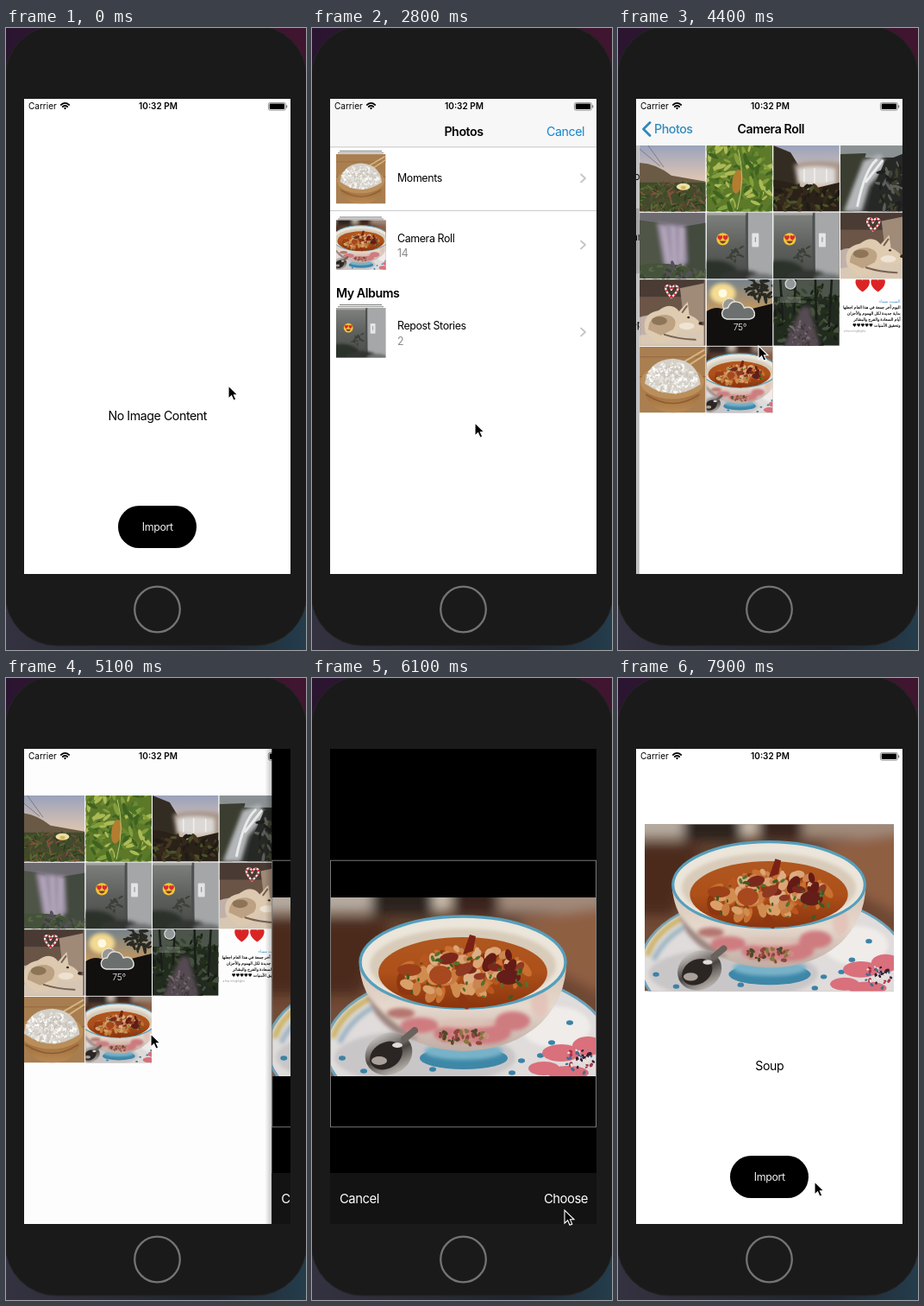
Write an HTML page that moves like this. It is 348 px wide and 720 px high and loops after 8000 ms.

```html
<!DOCTYPE html>
<html lang="en">
<head>
<meta charset="utf-8">
<title>Photo import</title>
<style>
  html, body { margin: 0; width: 100%; height: 100%; overflow: hidden; background: #1a1a1a; }
  svg { display: block; }
  text { font-family: Inter, Roboto, sans-serif; letter-spacing: -.03em; }
  .mid { text-anchor: middle; }
  .end { text-anchor: end; }
  .bold { font-weight: 600; }
  .status { font-size: 10px; letter-spacing: 0; }
  .row { font-size: 12.4px; }
  .nav { font-size: 14.2px; }
  .note { font-size: 4.7px; letter-spacing: 0; }
</style>
</head>
<body>
<svg id="stage" width="348" height="720" viewBox="0 0 348 720"></svg>
<script>
const W = 309, H = 550, LOOP = 8000;

let seed = 7;
const rnd = () => (seed = (seed * 16807) % 2147483647) / 2147483647;

// Elliptical spread of small rotated blobs.
function scatter(n, cx, cy, rx, ry, colors, sx, sy) {
  let out = '';
  for (let i = 0; i < n; i++) {
    const a = rnd() * 6.283, r = Math.sqrt(rnd()), k = .65 + rnd() * .7;
    const x = (cx + r * rx * Math.cos(a)).toFixed(1), y = (cy + r * ry * Math.sin(a)).toFixed(1);
    out += `<ellipse cx="${x}" cy="${y}" rx="${(sx * k).toFixed(1)}" ry="${(sy * k).toFixed(1)}" fill="${colors[i % colors.length]}" transform="rotate(${Math.round(rnd() * 180)} ${x} ${y})"/>`;
  }
  return out;
}
const rect = (x, y, w, h, fill, more = '') => `<rect x="${x}" y="${y}" width="${w}" height="${h}" fill="${fill}" ${more}/>`;
const oval = (x, y, rx, ry, fill, more = '') => `<ellipse cx="${x}" cy="${y}" rx="${rx}" ry="${ry}" fill="${fill}" ${more}/>`;
const path = (d, fill, more = '') => `<path d="${d}" fill="${fill}" ${more}/>`;
const line = (d, color, width) => path(d, 'none', `stroke="${color}" stroke-width="${width}" stroke-linecap="round" stroke-linejoin="round"`);
const text = (x, y, s, cls = '', fill = '#000', more = '') => `<text x="${x}" y="${y}" class="${cls}" fill="${fill}" ${more}>${s}</text>`;
const use = (id, x, y, w, h = w) => `<use href="#${id}" x="${x}" y="${y}" width="${w}" height="${h}"/>`;
const gradient = (id, ...stops) => `<linearGradient id="${id}" x2="0" y2="1">` +
  stops.map((c, i) => `<stop offset="${i / (stops.length - 1)}" stop-color="${c}"/>`).join('') + '</linearGradient>';
const symbol = (id, body, w = 77, h = 77) =>
  `<symbol id="${id}" viewBox="0 0 ${w} ${h}" preserveAspectRatio="xMidYMid slice">${body}</symbol>`;
const heart = (x, y, s, fill) => path('M0 9C-12 1-8-8-3-7Q0-6 0-3Q0-6 3-7C8-8 12 1 0 9Z', fill, `transform="translate(${x} ${y}) scale(${s})"`);
const blurs = { faint: .7, soft: 2.2, deep: 7 };
const soften = (body, amount = 'deep') => `<g filter="url(#${amount})">${body}</g>`;

const soup =
  rect(0, 0, 309, 207, 'url(#table)') +
  soften(rect(-20, -16, 75, 34, '#b5aa9f') + rect(48, -20, 80, 40, '#2b211c') + rect(120, -10, 20, 26, '#cfc3b3') +
    rect(142, -14, 58, 32, '#38231b') + rect(196, -16, 140, 34, '#a08a7a') + path('M215 25L330 10V120L270 90Z', '#8f5f43') +
    path('M-20 26H70L34 112H-20Z', '#4b2b1f')) +
  oval(160, 174, 165, 89, '#dfdcdb', 'stroke="#6aa3bd" stroke-width="3"') +
  soften(oval(110, 185, 105, 32, '#c9c6c8') + oval(262, 150, 40, 24, '#efecea') +
    line('M4 160Q14 134 44 118', '#cdb469', 7) + line('M12 166Q24 142 48 128', '#9cb4c2', 6), 'soft') +
  soften([[14, 186], [39, 201], [119, 199], [211, 203], [222, 189], [244, 183], [257, 168], [278, 145]]
    .map(([x, y]) => oval(x, y, 4, 2.8, '#3a83a6')).join('') +
    [[248, 198, 18, 8], [268, 180, 22, 10], [299, 172, 18, 11], [276, 203, 24, 8]].map(p => oval(...p, '#d9707c')).join('') +
    scatter(34, 288, 190, 18, 14, ['#321c32', '#a83047', '#ece2db', '#4a6b8d'], 2.4, 1.6), 'faint') +
  oval(155, 186, 51, 13, '#3d87a8') + soften(oval(155, 178, 46, 10, '#78b2c8'), 'soft') +
  path('M34 75Q34 110 66 143Q96 176 154 178Q211 177 245 145Q274 115 274 75Z', 'url(#bowl)') +
  soften(path('M40 108Q62 142 104 164Q76 165 52 134Z', '#9c8580') +
    [[104, 148, 22, 9], [178, 156, 32, 14], [212, 143, 20, 11], [146, 158, 26, 10]].map(p => oval(...p, '#cf7c80')).join('') +
    oval(82, 134, 16, 6, '#b57670') + oval(243, 122, 10, 16, '#e3c4ba') + oval(158, 146, 34, 5, '#dcc0b4'), 'soft') +
  soften(scatter(42, 154, 163, 33, 9, ['#4c4a29', '#8f463c', '#89763f', '#c98f82'], 3, 1.8), 'faint') +
  oval(154, 75, 119, 53, '#ebe5da', 'stroke="#559fbc" stroke-width="3.4"') +
  soften(oval(154, 79, 108, 43, '#d8cbb9'), 'soft') +
  oval(154, 87, 98, 41, 'url(#broth)') +
  soften(scatter(50, 154, 92, 82, 30, ['#b9561f', '#c8702f', '#8e3610'], 9, 4) +
    scatter(26, 138, 100, 52, 18, ['#d08d50', '#c97c3f', '#d9a06a'], 8, 5) +
    scatter(36, 168, 78, 54, 22, ['#dba577', '#cb8550', '#dcae84'], 6, 4) +
    scatter(10, 180, 76, 48, 19, ['#641b15', '#7c271b', '#8e3a23'], 9, 5) +
    oval(128, 90, 13, 11, '#a8481f') + oval(207, 92, 14, 9, '#641d18') + oval(92, 84, 14, 7, '#9c4019') +
    path('M154 66L162 43L169 45L166 62Z', '#7a2215') +
    scatter(32, 154, 94, 83, 31, ['#3c5a24', '#56702c'], 3, 1.6), 'faint') +
  oval(68, 181, 28, 24, 'url(#steel)', 'transform="rotate(-25 68 181)"') +
  soften(oval(65, 183, 20, 15, '#2b2624', 'transform="rotate(-30 65 183)"') + oval(57, 189, 9, 5, '#aaa19a') +
    oval(78, 171, 6, 3, '#e0dcd8') + line('M86 164L98 154', '#69625d', 8), 'faint');

const room =
  rect(0, 0, 77, 77, 'url(#wall)') + path('M48 0H77V77H49Z', '#a5a7a8') + path('M47 0V76', 'none', 'stroke="#4d5050" stroke-width="3"') +
  rect(0, 0, 46, 3, '#a5a5a0') + soften(oval(8, 70, 28, 14, '#2b302a') + oval(40, 76, 24, 9, '#333632') + oval(64, 78, 16, 7, '#6e7172'), 'soft') +
  rect(53, 24, 8, 16, '#e4e6e5', 'rx="1"') + line('M57 29V34', '#858989', 1) + scatter(14, 34, 46, 9, 13, ['#3b4038'], 3, 1) +
  oval(19, 31, 7.2, 7.2, '#f6c43a') + heart(15.8, 29, .36, '#d72d30') + heart(22.2, 29, .36, '#d72d30') +
  path('M15 33Q19 39 23 33Z', '#71401e');

const dog =
  rect(0, 0, 77, 77, '#6a5547') + rect(0, 0, 77, 20, '#4a3b34') + path('M48 10L77 4V49H53Z', '#a08a78') +
  path('M0 44Q36 32 77 55V77H0Z', '#c0b1ab') + path('M0 65L77 53V77H0Z', '#d8c8b4') +
  soften(path('M8 62Q2 40 23 36Q38 25 47 37L57 26L59 41Q72 46 74 57Q62 64 48 58Q39 76 20 73Z', '#decbb0') +
    path('M11 58Q12 40 33 41Q48 45 40 58L26 65Z', '#bda283') + oval(24, 48, 9, 5, '#8e7558') + oval(56, 54, 9, 4, '#efe4d3'), 'faint') +
  line('M51 38L56 31M30 64Q45 69 66 70', '#776154', 2) +
  oval(58, 44, 1.5, 1.2, '#30251f') + oval(72, 51, 2.3, 1.8, '#35271f') +
  line('M38 21Q28 10 33 7Q38 6 38 12Q40 5 45 8Q48 12 38 21', '#f5eeee', 2.2) +
  path('M38 21Q28 10 33 7Q38 6 38 12Q40 5 45 8Q48 12 38 21', 'none', 'stroke="#c82b32" stroke-width="2.2" stroke-dasharray="2 2.4"');

const cloud = 'M24 46Q18 45 18 39Q19 33 25 33Q28 24 36 26Q42 27 44 33Q54 30 56 39Q57 45 50 46Z';
const quote = ['اليوم آخر جمعة في هذا العام اجعلها', 'بداية جديدة لكل الهموم والأحزان', 'أيام السعادة والفرح والبشائر', '♥♥♥♥♥ وتحقيق الأمنيات'];

const photos = {
  meadow: rect(0, 0, 77, 77, 'url(#dusk)') + path('M0 20Q20 21 37 35L77 42V77H0Z', '#6b5a45') + line('M0 4L24 24M10 0L28 25', '#6d666c', .7) +
    rect(0, 43, 77, 34, '#3f4b2b') + scatter(170, 38, 62, 46, 19, ['#2c3b1c', '#5e6c32', '#5d4530', '#4a5a2a', '#80523c'], 4, .8) +
    oval(51, 48, 8, 4, '#ece1a8') + oval(51, 49, 3, 2, '#d5b957'),
  leaves: rect(0, 0, 77, 77, '#5d7a2a') + scatter(170, 38, 38, 53, 53, ['#83a03c', '#3f6320', '#adbb55', '#4e7226', '#6c8a30'], 6, 2) +
    oval(36, 42, 6, 14, '#b47d30', 'transform="rotate(8 36 42)"') + line('M37 5Q46 38 36 74', '#b9c56e', 1),
  falls: rect(0, 0, 77, 77, 'url(#dusk)') + path('M0 0L20 8L31 26V48H0Z', '#332c22') +
    soften(path('M24 22Q50 15 90 22V46H28Z', '#a8968a') + path('M28 27Q48 22 72 27V44Q48 48 30 43Z', '#dedad7'), 'soft') +
    line('M36 28V42M48 27V43M62 28V42', '#f2f0ee', 1.6) +
    path('M0 40Q26 43 39 52L77 43V77H0Z', '#2a2118') + scatter(70, 34, 62, 46, 15, ['#453821', '#1f1b15', '#4c5328', '#33281a'], 5, 2),
  cascade: rect(0, 0, 77, 77, '#2c2f2c') + rect(0, 0, 77, 14, '#8c9294') + path('M0 10L30 9L15 77H0Z', '#3a3d30') +
    soften(path('M27 17L47 10L54 24L34 47L25 77H4L17 43Z', '#b5b8ba'), 'soft') + line('M42 17Q29 28 20 70M49 18L30 42', '#ececec', 3) +
    path('M52 18L77 8V77H32L38 50Z', '#262825') + scatter(45, 62, 50, 18, 30, ['#41402f', '#1d201e', '#5d5f5c'], 5, 1.5),
  gorge: rect(0, 0, 77, 77, '#6d6a70') + path('M0 9L31 13L29 62L0 77Z', '#4f5547') + path('M77 12L48 17L52 61L77 77Z', '#434a3e') +
    soften(path('M20 12L54 16L56 58L43 69L28 60Z', '#9c8fa6') + line('M28 18L34 57M39 17L41 61M49 18L48 56', '#b9adc1', 4), 'soft') +
    path('M0 61Q39 55 77 70V77H0Z', '#46533b') + scatter(45, 38, 70, 44, 9, ['#3a4631', '#586447', '#55505a'], 4, 1.5),
  room, room2: room, dog,
  dog2: `<g transform="translate(-1 0)">${dog}</g>` + rect(75, 0, 2, 77, '#78655a'),
  sunset: rect(0, 0, 77, 77, 'url(#glow)') + soften(oval(19, 16, 15, 12, '#f5dc93'), 'soft') + oval(19, 16, 5, 5, '#fffbe2') +
    soften(path('M0 37Q12 29 24 37T45 36L85 26V85H0Z', '#11100f'), 'faint') + scatter(40, 64, 9, 18, 16, ['#292922'], 4, 1.5) +
    '<circle cx="27" cy="30" r="8" fill="#999990" stroke="#eee"/>' + path(cloud, '#6c706f', 'stroke="#e5e5e5" stroke-width="1.4"') +
    text(39, 59, '75°', 'mid', '#fff', 'font-size="10.5" font-weight="300"'),
  woods: rect(0, 0, 77, 77, '#222a20') + rect(0, 0, 77, 20, '#4d554c') + scatter(130, 38, 43, 43, 40, ['#233119', '#36452b', '#171f15', '#465240'], 4, 1.6) +
    soften(path('M33 32L42 32L55 82H10Z', '#574c53'), 'soft') + scatter(60, 34, 63, 18, 15, ['#75686f', '#403a3c', '#54494f'], 2, 1) +
    line('M8 0L11 47M26 0L24 40M49 0L50 46M68 0L65 54', '#191e18', 2.5) +
    '<circle cx="20" cy="5" r="6" fill="#92999a" stroke="#d8dcdc" stroke-width="1.3"/>' + rect(8, 20, 24, 7, '#9b9f99', 'opacity=".4"'),
  quote: rect(0, 0, 77, 77, '#fff') + heart(26, 5, 1.05, '#dc2424') + heart(44, 5, 1.05, '#dc2424') +
    text(70, 27, 'السبت مساء', 'note end', '#3588bb') +
    quote.map((s, i) => text(70, 34 + i * 7, s, 'note end bold', '#111')).join('') +
    text(4, 61, 'a few in highlights', '', '#999', 'font-size="3.2"'),
  rice: rect(0, 0, 77, 77, '#a97f51') + line('M0 12H77M0 35H77', '#94693f', 1) + line('M53 17L75 4M57 22L77 9', '#d9b47c', 2) +
    path('M2 38Q7 77 39 77Q72 77 75 38Z', 'url(#wood)') + oval(38, 41, 37, 20, '#bb8f5c') + path('M6 43Q10 15 39 14Q68 16 71 44Q38 66 6 43Z', '#d5d1c9') +
    scatter(230, 38, 36, 29, 18, ['#f4f2ee', '#c8c3ba', '#e6e3dd', '#fff'], 2.2, .8) + soften(line('M8 56Q39 76 69 56', '#8b5c34', 1.5), 'faint')
};

const defs = ['table', 'bowl', 'broth', 'steel', 'wall', 'dusk', 'glow', 'wood'].map((id, i) => gradient(id, ...[
  ['#5d4030', '#6c4632', '#835841'], ['#d3c3b4', '#e6d8cc', '#bfaca4'], ['#b05720', '#ad5019', '#8a340e'],
  ['#c6c2be', '#4b4542', '#b8b3ad'], ['#80827f', '#5d605c', '#484b47'], ['#9aa3bd', '#dcc4b2', '#c9a78a'],
  ['#75838d', '#c99a5c', '#453628'], ['#c0925c', '#a4733f', '#b98a55']
][i])).join('') +
  Object.entries(blurs).map(([id, r]) => `<filter id="${id}" x="-30%" y="-30%" width="160%" height="160%"><feGaussianBlur stdDeviation="${r}"/></filter>`).join('') +
  symbol('soup', soup, 309, 207) +
  Object.entries(photos).map(([id, body]) => symbol(id, body)).join('') +
  '<clipPath id="screen"><rect x="21" y="82" width="309" height="550"/></clipPath>' +
  '<linearGradient id="shade"><stop stop-opacity="0"/><stop offset="1" stop-opacity=".22"/></linearGradient>' +
  '<linearGradient id="wallTop"><stop stop-color="#2a1531"/><stop offset="1" stop-color="#40152f"/></linearGradient>' +
  '<linearGradient id="wallBottom"><stop stop-color="#343240"/><stop offset=".7" stop-color="#20242e"/><stop offset="1" stop-color="#243d4c"/></linearGradient>';

const chevron = y => line(`M312 ${y - 4.5}L317 ${y}L312 ${y + 4.5}`, '#c4c4c9', 1.7);
function album(photo, y, name, count, nameY) {
  return rect(32, y - 4, 49, 1, '#777') + rect(30, y - 2, 53, 1.2, '#999') + use(photo, 28, y, 57.5) +
    text(99, nameY, name, 'row') + (count ? text(99, nameY + 17.5, count, 'row', '#8a8a8e') : '');
}

const list = rect(21, 82, W, H, '#fff') + rect(21, 211, W, 75, '#d9d9d9', 'id="pressed"') +
  album('rice', 146, 'Moments', '', 177.5) + chevron(174) + rect(21, 211, W, 1, '#cbcbce') +
  album('soup', 222.5, 'Camera Roll', '14', 247.5) + chevron(251) +
  text(28, 312, 'My Albums', 'nav bold') + album('room', 324, 'Repost Stories', '2', 349) + chevron(352);

const grid = rect(13, 82, 8, H, 'url(#shade)') + rect(21, 82, W, H, '#fff') +
  [...Object.keys(photos), 'soup'].map((id, i) => use(id, 21.3 + i % 4 * 77.6, 136 + (i >> 2) * 77.6, 76.6)).join('');

const nav = rect(21, 82, W, 54, '#f7f7f8') + '<g id="listBar">' + rect(21, 136, W, 2, '#f7f7f8') + rect(21, 137.5, W, .8, '#b9b9bc') +
  text(316, 124.5, 'Cancel', 'nav end', '#1285c8') + '</g>' + text(0, 0, 'Photos', 'nav bold mid', '#000', 'id="listTitle"') +
  '<g id="back">' + line('M37 109.5L29.5 117L37 124.5', '#2b87b8', 2.8) + text(42, 122, 'Photos', 'nav', '#2b87b8', 'font-weight="500"') + '</g>' +
  text(0, 122, 'Camera Roll', 'nav bold mid', '#000', 'id="gridTitle"');

const status = text(26, 94.4, 'Carrier', 'status') + text(176.5, 94.4, '10:32 PM', 'status bold mid') +
  line('M63.8 89Q68.5 84.9 73.2 89M65.7 91.2Q68.5 88.8 71.3 91.2', '#000', 1.7) + path('M66.8 92.5Q68.5 91.3 70.2 92.5L68.5 94.6Z', '#000') +
  rect(304.4, 86.4, 20, 8.8, '#fff', 'rx="2" stroke="#777" stroke-width=".8"') + rect(305.7, 87.6, 17.4, 6.4, '#000', 'rx="1"') +
  rect(325.1, 89.2, 1.2, 3.2, '#777', 'rx=".6"');

const home = rect(21, 82, W, H, '#fff') + '<g id="picked">' + use('soup', 31, 169.4, 289, 193) + '</g>' +
  text(175.7, 454, '', 'nav mid', '#000', 'id="label"') + rect(130, 553, 91, 49, '#000', 'rx="24.5"') +
  text(175.7, 582, 'Import', 'mid', '#eee', 'font-size="12.4"');

const crop = rect(13, 82, 8, H, 'url(#shade)') + rect(21, 82, W, H, '#000') + use('soup', 21, 254, W, 207) +
  rect(21.5, 211.2, 308, 308.6, 'none', 'stroke="#858585" stroke-width=".9"') + rect(21, 573, W, 59, '#131313') +
  text(32, 608, 'Cancel', '', '#fff', 'font-size="14.8"') + text(320, 608, 'Choose', 'end', '#fff', 'font-size="14.8"');

document.getElementById('stage').innerHTML = `<defs>${defs}</defs>` +
  rect(0, 0, 348, 360, 'url(#wallTop)') + rect(0, 360, 348, 360, 'url(#wallBottom)') +
  rect(-1, -3, 350, 718, '#1a1a1a', 'rx="60" stroke="#262626" stroke-width="1"') +
  '<circle cx="175.5" cy="673" r="26.3" fill="#1a1a1a" stroke="#747474" stroke-width="2.3"/>' +
  `<g clip-path="url(#screen)">${home}<g id="picker"><g id="list">${list}</g>${rect(21, 82, W, H, '#000', 'id="listDim"')}` +
  `<g id="grid">${grid}</g><g id="nav">${nav}</g></g><g>${status}</g>${rect(21, 82, W, H, '#000', 'id="gridDim"')}<g id="crop">${crop}</g></g>` +
  path('M0 0V15.2L3.6 11.8L6 17.3L8.8 16.1L6.4 10.8H11Z', '#000', 'id="cursor" stroke="#fff" stroke-width="1.1"');

const $ = Object.fromEntries([...document.querySelectorAll('#stage > *, #stage g [id], #stage g[id]')].filter(e => e.id).map(e => [e.id, e]));
const move = (el, x, y) => el.setAttribute('transform', `translate(${x.toFixed(2)} ${y.toFixed(2)})`);
const fade = (el, v) => el.setAttribute('opacity', v.toFixed(3));
const show = (el, on) => el.setAttribute('display', on ? 'inline' : 'none');

// Critically damped spring that settles within 600 ms.
function spring(t, start) {
  const x = (t - start) * .016;
  return x <= 0 ? 0 : x > 9.6 ? 1 : 1 - (1 + x) * Math.exp(-x);
}

const CLOSE = 7181.5;
const trail = [[0, 258, 414], [250, 258, 414], [1000, 190, 574], [1600, 190, 574], [2400, 189, 474], [2800, 189, 457], [3600, 166, 255],
  [4000, 166, 255], [4400, 163, 368], [4700, 168, 412], [5200, 168, 412], [6000, 293, 616], [6300, 293, 616],
  [6800, 288, 604], [7250, 288, 604], [7800, 228, 583], [8000, 228, 583]];
function pointer(t) {
  const i = trail.findIndex(k => k[0] > t), [t0, x0, y0] = trail[i - 1], [t1, x1, y1] = trail[i];
  const u = (t - t0) / (t1 - t0), e = u * u * (3 - 2 * u);
  return [x0 + (x1 - x0) * e, y0 + (y1 - y0) * e];
}

function render(t) {
  const open = spring(t, 1600), album = spring(t, 4000), edit = spring(t, 5074), close = spring(t, CLOSE);
  const done = t >= CLOSE;
  show($.picked, done);
  $.label.textContent = done ? 'Soup' : 'No Image Content';

  show($.picker, open > 0 && !done);
  move($.picker, 0, H * (1 - open));
  move($.list, -.3 * W * album, -2 * album);
  show($.pressed, t >= 3900);
  fade($.listDim, .1 * album);
  move($.grid, W * (1 - album) - .3 * W * edit, 0);
  show($.grid, album > 0);

  show($.nav, edit === 0);
  fade($.listBar, Math.max(0, 1 - 2 * album));
  move($.listTitle, 176 - 112 * album, 124.5 - 2.5 * album);
  fade($.listTitle, Math.max(0, 1 - 1.6 * album));
  fade($.back, Math.max(0, 2 * album - 1));
  move($.gridTitle, 175.7 + 130 * (1 - album), 0);
  fade($.gridTitle, album);

  fade($.gridDim, done ? 0 : .1 * edit);
  show($.crop, edit > 0 && close < 1);
  move($.crop, W * (1 - edit), H * close);
  move($.cursor, ...pointer(t));
}

function tick() {
  render(performance.now() % LOOP);
  requestAnimationFrame(tick);
}
tick();
</script>
</body>
</html>
```
